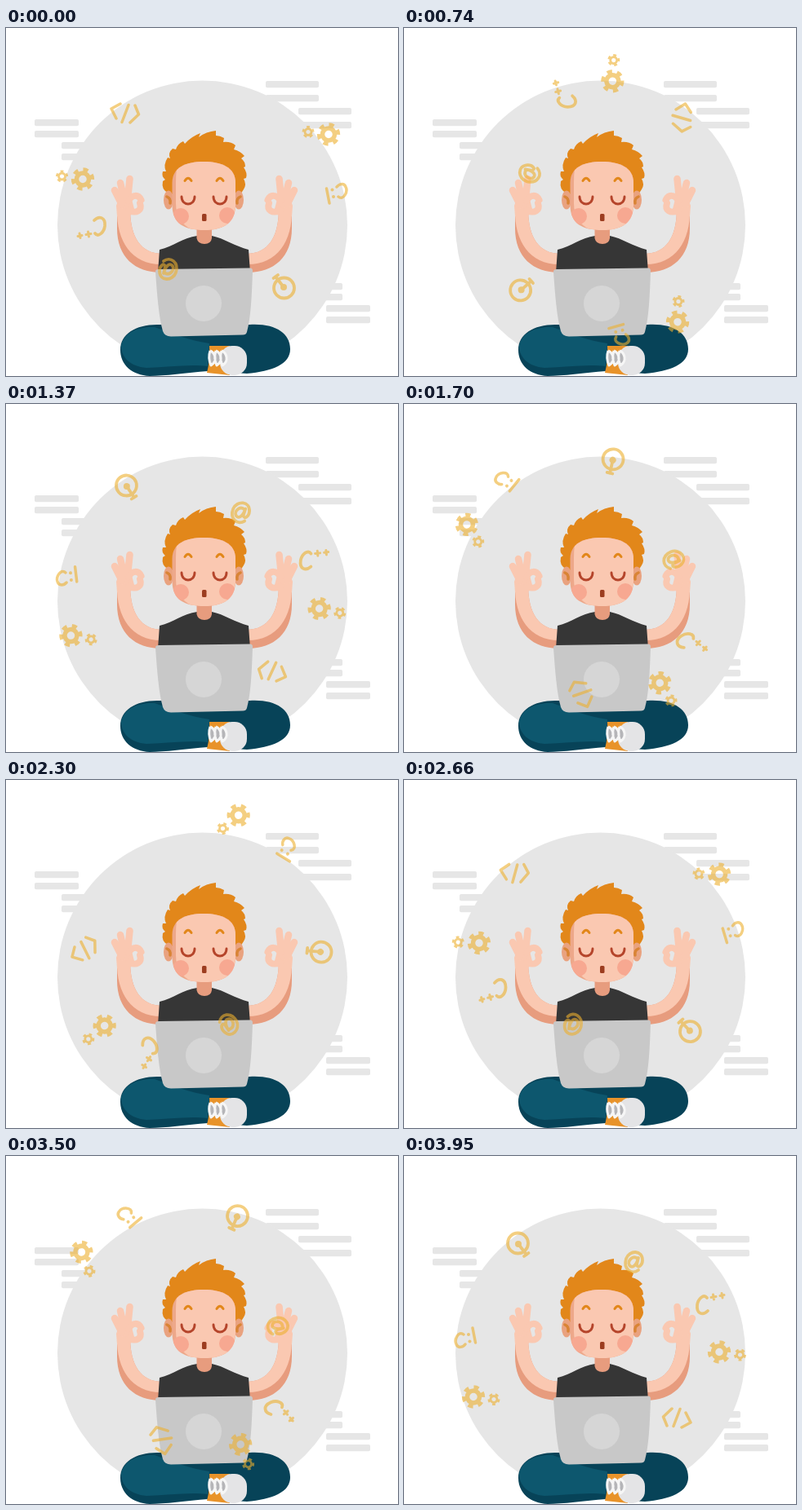
Animation of 480 by 427 pixels, one loop 4.12 s. Source, as an HTML page:

```html
<!DOCTYPE html>
<html lang="en">
<head>
<meta charset="utf-8">
<title>Meditating developer</title>
<style>
  html, body { margin: 0; width: 100%; height: 100%; overflow: hidden; background: #fff; }
  svg { display: block; width: 480px; height: 427px; }
  .line { fill: none; stroke-linecap: round; stroke-linejoin: round; }
</style>
</head>
<body>
<svg viewBox="0 0 480 427">
  <defs>
    <clipPath id="face"><path d="M203.500 190C203.500 171 220 164 242 164S281 171 281 190V217C281 238 268 248 243 248S203.500 240 203.500 217Z"/></clipPath>
    <g id="gear" fill="none" stroke="#edb02f">
      <circle r="7.500" stroke-width="5.500"/>
      <circle r="11.700" stroke-width="5" pathLength="12" stroke-dasharray="1 1" transform="rotate(32)"/>
    </g>
    <g id="cog" fill="none" stroke="#edb02f">
      <circle r="4" stroke-width="2.800"/>
      <circle r="6" stroke-width="3" pathLength="10" stroke-dasharray="1 1"/>
    </g>
    <g id="arm">
      <path fill="#e79c7e" d="M136 222V246C136 281 158 300 190 300V277C166 276 152 258 152 222Z"/>
      <path fill="#fac8b1" d="M136 222C135 262 154 290 190 290V277C166 276 152 258 152 222Z"/>
      <path fill="#fac8b1" d="M139 206L153 206 157 222 152 231H136L135 218Z"/>
      <g class="line" stroke="#fac8b1" stroke-width="8.500">
        <path d="M142 217L133 199M145 211L140 190M149 210L151.500 185"/>
        <path stroke-width="8" d="M150 212C155 204 162 204 165.500 211M150 224C160 228 167 224 164 215"/>
      </g>
    </g>
  </defs>

  <g fill="#e6e6e6">
    <g id="bars"></g>
    <circle cx="240.500" cy="242" r="177.500"/>
  </g>

  <use href="#arm"/>
  <use href="#arm" transform="matrix(-1 0 0 1 486 0)"/>

  <path fill="#363636" d="M186 300L188 272C205 268 217 257 234 255H252C267 258 281 268 297 272L299 300Z"/>
  <path fill="#e79c7e" d="M233.500 240H252V258Q251 265 243 265T233.500 258Z"/>

  <path fill="#e2871a" d="M198 202Q190 198 192 188L195 186Q190 182 192 176L196 176Q192 168 198 159L201 160Q198 153 204 148L208 149Q210 142 217 139L219 142Q227 133 238 129L236 134Q245 127 257 126L257 132Q262 132 267 135L266 140Q275 139 281 144L279 149Q287 151 292 157L288 160Q293 164 293 170L291 171Q296 178 294 184L291 185Q295 192 291 198L287 204H199Z"/>
  <ellipse cx="199" cy="211" rx="6" ry="11.500" fill="#e9a27f"/>
  <ellipse cx="285" cy="211" rx="6" ry="11.500" fill="#e9a27f"/>
  <path class="line" stroke="#d98435" stroke-width="3.500" d="M197 207Q202 209 201 215M287 207Q282 209 283 215"/>
  <g clip-path="url(#face)">
    <path fill="#eda88a" d="M200 160H284V252H200Z"/>
    <path fill="#fac8b1" d="M212 160H284V252H240Q208 244 208 215V190Q208 170 212 160Z"/>
    <circle cx="214" cy="231" r="10" fill="#f7a891"/>
    <circle cx="271" cy="230" r="10" fill="#f7a891"/>
  </g>
  <path class="line" stroke="#e2871a" stroke-width="3" d="M219 187.500Q223 181 227 187.500M258 187.500Q262 181 266 187.500"/>
  <path class="line" stroke="#b5452b" stroke-width="2.900" d="M215 207C215 219 231 219 231 207M254 207C254 219 270 219 270 207"/>
  <rect x="240" y="228" width="5.500" height="9" rx="1.500" fill="#9c3d20"/>

  <path fill="#074358" d="M140 395C140 375 160 363 188 364H298C329 362 348 374 348 394C348 413 326 421 295 424L247 421C222 423 194 427 176 427C154 426 140 413 140 395Z"/>
  <path fill="#0d576e" d="M141 391C143 375 160 366 182 367C202 374 222 383 249 387L247 415C225 412 199 416 172 417C152 415 142 405 141 391Z"/>
  <path fill="#e8932a" d="M249 390H274V426L246 423Q250 408 249 390Z"/>
  <rect x="262" y="390" width="33" height="36" rx="15" fill="#e4e4e6"/>
  <path fill="#b5b5b8" stroke="#f6f6f6" stroke-width="3" stroke-linejoin="round" d="M250 396Q247 405 251 414Q257 410 256 404T250 396M257 396Q254 405 258 414Q264 410 263 404T257 396M264 396Q261 405 265 414Q271 410 270 404T264 396"/>

  <path fill="#c8c8c8" d="M183 299Q183 296 187 296L299 294.500Q302 294.500 302 298C301 327 300 355 295 373Q294 376.500 290 376.500L202 378.500Q194 378 192 372C187 354 185 327 183 299Z"/>
  <circle cx="242" cy="338" r="22" fill="#d6d6d6"/>

  <g opacity=".6">
    <g id="orbit" fill="#edb02f">
      <g class="line" stroke="#edb02f" stroke-width="3.800">
        <circle cx="139.500" cy="107" r="12.500"/>
        <path d="M140 108L150 121M147 123L152.500 119"/>
        <path d="M286 126C280 121 273 129 276 134C280 139 285 133 287 125L285 133C286 139 292 134 292 128C292 115 276 115 272 126C268 139 279 146 287 140"/>
        <path d="M371 174C367 169 360 175 359 183C358 194 366 196 372 190"/>
        <path stroke-width="3" d="M376 173.500L382 172.500M378.500 170L379.500 176M387 171.500L392 170.500M389 168.500L390 174"/>
        <path stroke-width="3.500" d="M328 310L317.500 320 322 331M338 310.500L330 331.500M345 315L351 327 340 333"/>
        <path stroke-width="3.500" d="M73 219C67 214 61 225 64 231C66 236 72 235 75 231M84 211L87.500 229"/>
      </g>
      <circle cx="140" cy="108" r="4"/>
      <circle cx="79" cy="219" r="2"/>
      <circle cx="80.500" cy="227.500" r="2"/>
      <use href="#gear" transform="translate(386 240.500)"/>
      <use href="#cog" transform="translate(411.500 244)"/>
      <use href="#gear" transform="translate(85 295.500)"/>
      <use href="#cog" transform="translate(110 298.500)"/>
    </g>
  </g>
</svg>
<script>
  const LOOP = 4120, FIRST_HOLD = 230, STEP = 30, LAST = 125;
  // Step and angle where the rotation changes speed or direction
  const KEYS = [[0, 180], [38, 360], [81, 538.4], [LAST, 360]];

  const orbit = document.getElementById('orbit');

  const bars = [[318, 65, 65], [318, 82, 65], [358, 98, 65], [358, 115, 65],
    [35, 112, 54], [35, 126, 54], [68, 140, 40], [68, 154, 40],
    [360, 313, 52], [360, 326, 52], [392, 340, 54], [392, 354, 54]];
  document.getElementById('bars').innerHTML = bars.map(([x, y, w]) =>
    `<rect x="${x}" y="${y}" width="${w}" height="8.300" rx="2"/>`).join('');

  function angleAt(step) {
    const i = Math.max(1, KEYS.findIndex(([s]) => step <= s));
    const [s0, a0] = KEYS[i - 1], [s1, a1] = KEYS[i];
    return a0 + (a1 - a0) * (step - s0) / (s1 - s0);
  }

  function draw() {
    const time = performance.now() % LOOP;
    const step = Math.min(LAST, Math.max(0, Math.floor((time - FIRST_HOLD) / STEP) + 1));
    orbit.setAttribute('transform', `rotate(${angleAt(step)} 240 213)`);
    requestAnimationFrame(draw);
  }
  draw();
</script>
</body>
</html>
```
